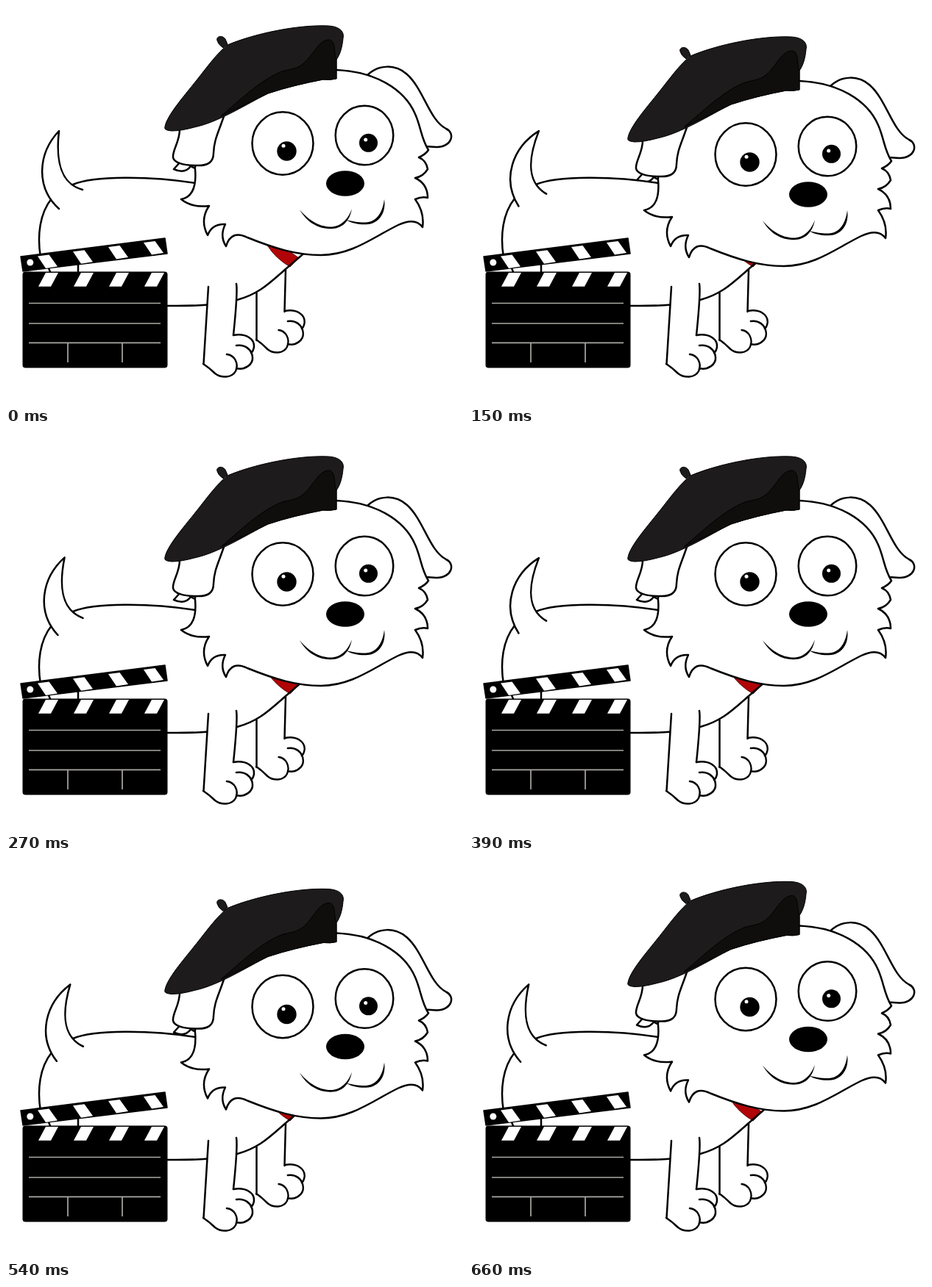
Animation, 621 px wide and 543 px high, one loop 0.69 s. Source, as an HTML page:

```html
<!DOCTYPE html>
<html lang="en">
<head>
<meta charset="utf-8">
<title>Film dog</title>
<style>
html, body { margin: 0; width: 100%; height: 100%; overflow: hidden; background: #fff; }
svg { display: block; width: 621px; height: 543px; }
.ink { fill: none; stroke: #000; stroke-width: 2.5; stroke-linecap: round; stroke-linejoin: round; }
.skin { fill: #fff; }
</style>
</head>
<body>
<svg viewBox="0 0 621 543">
  <defs>
    <g id="paw" class="ink">
      <path class="skin" d="M268 487L284 500C294 507 307 506 313 493C324 496 336 488 335 478L333 472Q337 470 337 463C336 451 327 446 309 448Z" stroke="none"/>
      <path d="M268 487Q277 493 284 500C293 507 307 506 312 497C317 486 310 475 300 474M313 493C324 496 336 488 335 478C334 467 324 460 313 462M309 448C326 445 338 453 337 464Q336 470 333 472"/>
    </g>
  </defs>

  <g class="head ink">
    <path class="skin" d="M237 212L228 222Q243 229 251 218L257 221V200Z"/>
  </g>

  <g class="ink">
    <path class="skin" stroke="none" d="M62 262C45 285 42 312 47 340L60 400L219 408L316 400Q345 391 403 338L300 250L257 241Q170 229 93 243Z"/>
    <path d="M62 262C46 282 42 312 47 342M91 243C118 231 196 231 257 241M219 408Q250 408.500 275 406.500M57 354L60 362M98 350V363"/>
  </g>

  <g id="tail" class="ink">
    <path class="skin" stroke="none" d="M72 276C40 247 43 201 72 170C68 205 71 241 104 250Z"/>
    <path d="M72 276C40 247 43 201 72 170C68 205 71 241 104 250"/>
  </g>

  <path d="M350 318L374 326L398 343L386 355Q366 343 356 327Z" fill="#b00406" stroke="#5c0000" stroke-width="1"/>

  <g class="ink">
    <path class="skin" stroke="none" d="M341 389L380 358L378 416L341 457Z"/>
    <use href="#paw" transform="translate(85.500 -33) scale(.95 1)"/>
    <path d="M340.500 390V455M380 359L378.500 416M416 327Q388 351 380 358C356 379 343 392 314 400"/>
    <path class="skin" stroke="none" d="M275 382L313 378L309 449L268 487Z"/>
    <use href="#paw"/>
    <path d="M275 382L268.500 487M313 378Q315 390 309 448"/>
  </g>

  <g class="head">
    <g class="ink">
      <path class="skin" d="M491 94C507 79 529 79 545 93C568 114 575 155 598 167C611 173 606 192 585 192L570 191Z"/>
      <path class="skin" d="M257 222C259 245 254 260 238 263Q253 275 276 272Q263 291 274 312Q280 296 298 297Q290 313 299 327Q306 304 328 315C365 330 395 339 428 339C470 339 500 314 533 298Q556 287 566 301Q569 281 556 263Q565 259 573 261Q573 242 556 234Q567 232 573 222Q571 210 561 206Q570 202 574 196C564 180 564 165 556 147C541 112 500 89 449 87"/>
      <path class="skin" d="M236 168C236 185 226 196 227 206C228 213 241 217 258 217C275 218 282 212 282 200C283 180 289 172 297 147Z"/>
      <ellipse cx="376" cy="187" rx="41.500" ry="42.700" class="skin"/>
      <ellipse cx="487" cy="176" rx="39.300" ry="40.300" class="skin"/>
    </g>
    <circle cx="381.500" cy="197.500" r="13.200"/>
    <circle cx="492.500" cy="186.300" r="12.500"/>
    <circle cx="377" cy="190.300" r="2.500" fill="#fff"/>
    <circle cx="488.700" cy="182" r="2.500" fill="#fff"/>
    <ellipse cx="461" cy="241.500" rx="26" ry="17.200"/>
    <path d="M399 277C414 295 429 300.500 441 300.500C455 300.500 465 290 470 276C467 293 457 303.200 441 303.200C425 303.200 409 295 399 277ZM462 291C474 294 482 294.500 489 294.500C503 294 512 281 514 263C517 282 506 297 489 297.200C480 297.500 470 296 462 291Z"/>

    <g stroke="#000" stroke-linejoin="round">
      <path d="M301 52L298 45C294 39 285 41 287 47Q288 52 295 57Z" fill="#1d1b1c"/>
      <path d="M216 164C219 149 239 126 259 101C274 82 287 64 301 53C336 38 396 25 438 27C455 28 460 36 458 44C457 56 454 66 449 73V99Q441 101 431 100C405 105 380 111 356 119C326 134 289 158 256 165Q238 170 225 170C217 169 215 168 216 164Z" fill="#1d1b1c"/>
      <path d="M292 150C318 128 345 101 375 89C386 86 393 86 402 80C417 69 424 46 439 46C449 47 445 65 449 73V99Q441 101 431 100C405 105 380 111 356 119Q329 132 292 150Z" fill="#0f0e0d"/>
    </g>
  </g>

  <path d="M20 341L216 316L219 337L23 361Z" stroke="#000" stroke-width="1.500" stroke-linejoin="round"/>
  <rect x="22.500" y="361.500" width="197" height="131" rx="4"/>
  <g id="stripes" fill="#fff"></g>
  <circle cx="32.800" cy="349" r="4.500" fill="#fff"/>
  <path d="M31 404.500H210M31 432H210M31 458.300H210M84 458V485M158 458V485" fill="none" stroke="#aaa9a3" stroke-width="1.700"/>
</svg>
<script>
const STEP = 30, COUNT = 23;
const headKeys = [[0, 0], [5, 15], [11, 0], [17, 15], [23, 0]];
const tailKeys = [[0, 0], [5, 15], [9, 5], [10, 0], [13, 15], [16, 0], [19, 15], [24, 0]];
const heads = document.querySelectorAll('.head');
const tail = document.getElementById('tail');

let marks = '';
for (let i = 0; i < 4; i++) {
  const x = i * 48, y = -i * 6.2;
  marks += `<path d="M${43 + x} ${340.5 + y}l15.500 -2l11.500 16l-16 2.500z"/>`;
  marks += `<path d="M${44 + x} 381.800l10 -18.800h17l-10 18.800z"/>`;
}
document.getElementById('stripes').innerHTML = marks;

function valueAt(keys, k) {
  const i = keys.findIndex(key => key[0] > k);
  const [k0, v0] = keys[i - 1], [k1, v1] = keys[i];
  return v0 + (v1 - v0) * (k - k0) / (k1 - k0);
}

function draw(ms) {
  const k = Math.floor(ms / STEP) % COUNT;
  const shift = `translate(0 ${valueAt(headKeys, k)})`;
  heads.forEach(h => h.setAttribute('transform', shift));
  tail.setAttribute('transform', `rotate(${valueAt(tailKeys, k)} 83 257)`);
}

const start = performance.now();
function tick(now) {
  draw(Math.max(0, now - start));
  requestAnimationFrame(tick);
}
draw(0);
requestAnimationFrame(tick);
</script>
</body>
</html>
```
